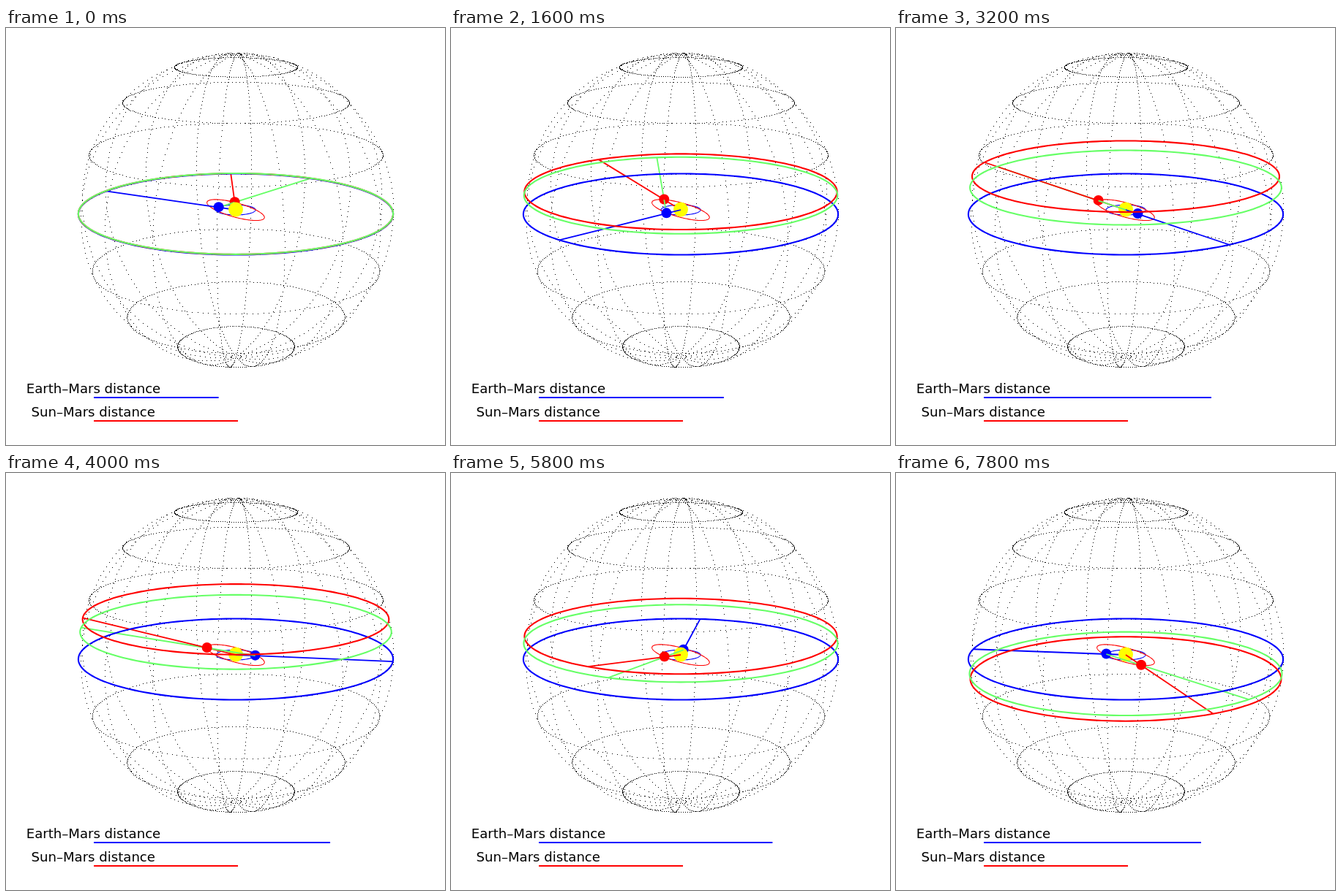
An HTML page with a canvas that plays this animation: 600x571 px, repeating every 8000 ms.

```html
<!DOCTYPE html>
<html lang="en">
<head>
<meta charset="utf-8">
<title>Earth–Mars distance</title>
<style>
  html, body { margin: 0; width: 100%; height: 100%; overflow: hidden; background: #fff; }
  canvas { display: block; }
</style>
</head>
<body>
<canvas id="stage" width="600" height="571"></canvas>
<script>
const ctx = document.getElementById('stage').getContext('2d');
const BLUE = '#00f', RED = '#f00', GREEN = '#6f6', YELLOW = '#ff0';
const STEP_MS = 200, STEPS = 40;
const EARTH_RADIUS = 0.126, MARS_RADIUS = 0.19, BAR_SCALE = 1037;
const MARS_TILT = 0.267, MARS_NODE = 1.5;
const SUN = [0, 0, 0];

// Perspective camera looking down on the unit sphere.
const CAMERA = { distance: 8.95, focal: 1914, sin: 0.2565, cos: 0.9665, x: 314, y: 249 };

const rad = degrees => degrees * Math.PI / 180;
const sinD = degrees => Math.sin(rad(degrees));
const cosD = degrees => Math.cos(rad(degrees));

// Longitude runs from the far side towards the left.
const spherical = (lon, lat, r = 1) =>
  [-r * cosD(lat) * sinD(lon), r * cosD(lat) * cosD(lon), r * sinD(lat)];
const depth = ([, y, z]) => y * CAMERA.cos - z * CAMERA.sin;
const middle = (a, b) => a.map((v, i) => (v + b[i]) / 2);
const dot = (a, b) => a.reduce((sum, v, i) => sum + v * b[i], 0);
const latitude = p => Math.asin(p[2] / Math.hypot(...p)) * 180 / Math.PI;

function project(p) {
  const scale = CAMERA.focal / (CAMERA.distance + depth(p));
  return [CAMERA.x + p[0] * scale,
          CAMERA.y - (p[1] * CAMERA.sin + p[2] * CAMERA.cos) * scale];
}

// Where the ray from a through b leaves the unit sphere.
function sphereHit(a, b) {
  const length = Math.hypot(...b.map((v, i) => v - a[i]));
  const dir = b.map((v, i) => (v - a[i]) / length);
  const along = dot(a, dir);
  const t = -along + Math.sqrt(along * along - dot(a, a) + 1);
  return a.map((v, i) => v + dir[i] * t);
}

function stroke(points, color, width) {
  ctx.beginPath();
  points.forEach(p => ctx.lineTo(...project(p)));
  ctx.strokeStyle = color;
  ctx.lineWidth = width;
  ctx.stroke();
}

function disc(p, color, radius) {
  const [x, y] = project(p);
  ctx.beginPath();
  ctx.arc(x, y - 0.5, radius, 0, 2 * Math.PI);
  ctx.fillStyle = color;
  ctx.fill();
}

const ring = pointAt => Array.from({ length: 181 }, (_, i) => pointAt(i * 2));
const parallel = (lat, color) => stroke(ring(lon => spherical(lon, lat)), color, 2.1);

const earthAt = lon => spherical(lon, 0, EARTH_RADIUS);
const marsAt = lon => spherical(lon,
  Math.atan(MARS_TILT * sinD(lon - MARS_NODE)) * 180 / Math.PI, MARS_RADIUS);
const earthLongitude = k => 61.5 + 9.83 * k + 6 * sinD(9.83 * (k - 17.5));
const marsLongitude = k => 1.6 + 5.24 * k + 13.1 * sinD(5.24 * (k - 34.7));

function dottedSphere() {
  ctx.fillStyle = '#000';
  const plot = (lon, lat) => {
    const [x, y] = project(spherical(lon, lat));
    ctx.fillRect(Math.round(x), Math.round(y), 1, 1);
  };
  for (let lat = -67.5; lat < 90; lat += 22.5)
    for (let lon = 0; lon < 360; lon += 2) plot(lon, lat);
  for (let lon = 16.2; lon < 376; lon += 22.5)
    for (let lat = -90; lat <= 90; lat += 2) plot(lon, lat);
}

function distanceBar(label, x, y, length, color) {
  ctx.fillStyle = '#000';
  ctx.font = '18.1px "DejaVu Sans", sans-serif';
  ctx.fillText(label, x, y);
  ctx.fillStyle = color;
  ctx.fillRect(120, y + 5, length, 2);
}

function draw(k) {
  const earth = earthAt(earthLongitude(k)), mars = marsAt(marsLongitude(k));
  const earthHit = sphereHit(SUN, earth);
  const marsHit = sphereHit(SUN, mars);
  const sightHit = sphereHit(earth, mars);

  ctx.fillStyle = '#fff';
  ctx.fillRect(0, 0, 600, 571);
  dottedSphere();
  stroke(ring(earthAt), BLUE, 1.1);
  stroke(ring(marsAt), RED, 1.1);

  stroke([mars, sightHit], GREEN, 1.8);
  stroke([earth, earthHit], BLUE, 1.8);
  stroke([mars, marsHit], RED, 1.8);

  const body = (p, color, radius) => ({ at: depth(p), paint: () => disc(p, color, radius) });
  const link = (a, b, color) =>
    ({ at: depth(middle(a, b)), paint: () => stroke([a, b], color, 1.8) });
  [
    body(SUN, YELLOW, 10), body(earth, BLUE, 7), body(mars, RED, 7),
    link(earth, mars, GREEN), link(SUN, earth, BLUE), link(SUN, mars, RED)
  ].sort((a, b) => b.at - a.at).forEach(item => item.paint());

  parallel(0, BLUE);
  parallel(latitude(marsHit), RED);
  parallel(latitude(sightHit), GREEN);

  const separation = Math.hypot(...earth.map((v, i) => v - mars[i]));
  distanceBar('Earth–Mars distance', 27.7, 500, separation * BAR_SCALE, BLUE);
  distanceBar('Sun–Mars distance', 34.5, 532, MARS_RADIUS * BAR_SCALE, RED);
}

let shown = -1;
const start = performance.now();
function tick() {
  const k = Math.floor((performance.now() - start) / STEP_MS) % STEPS;
  if (k !== shown) draw(shown = k);
  requestAnimationFrame(tick);
}
tick();
</script>
</body>
</html>
```
